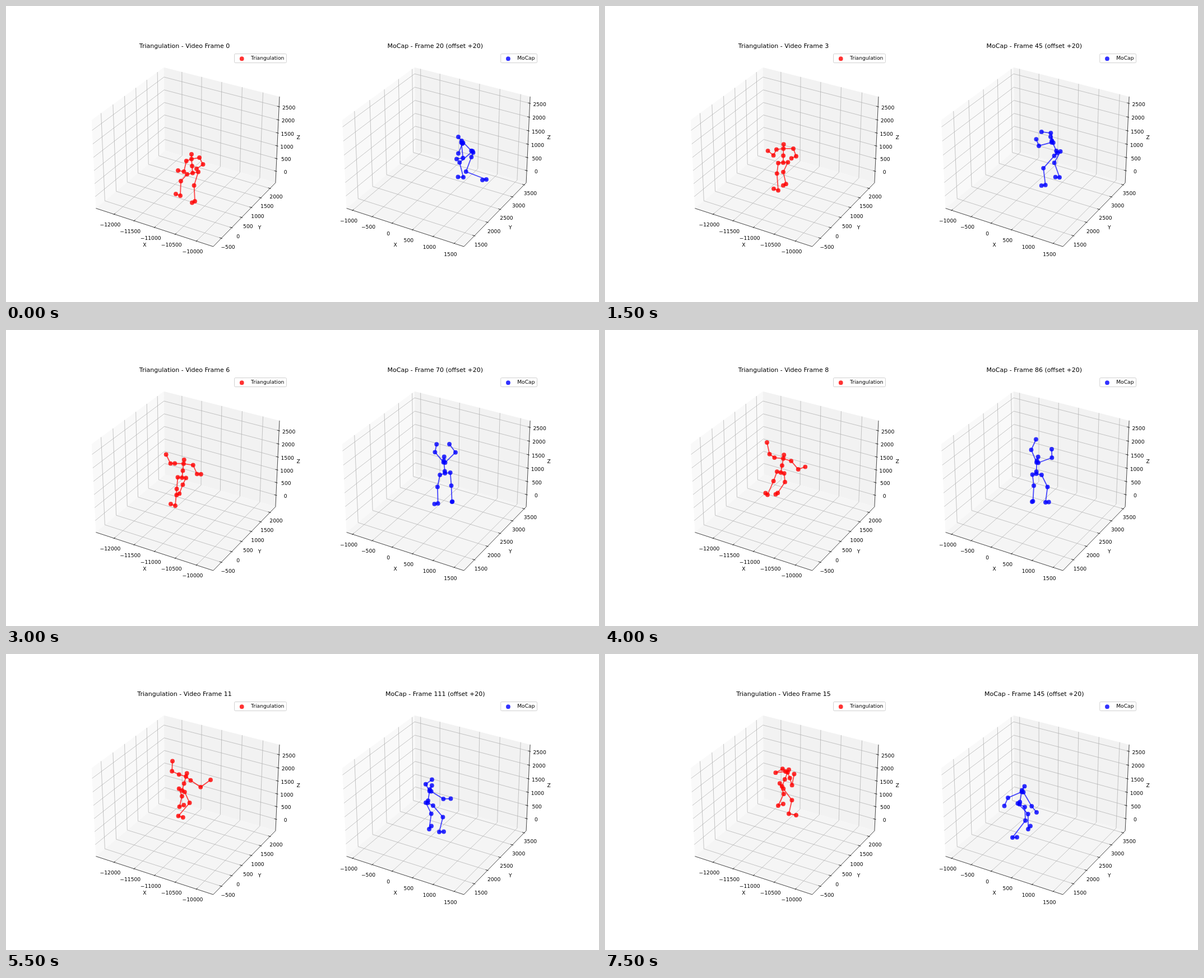
These frames come from a looping animation (1058 by 529 pixels, 8000 ms). An HTML page:

```html
<!DOCTYPE html>
<html lang="en">
<head>
<meta charset="utf-8">
<title>Skeleton comparison</title>
<style>
html, body { margin: 0; width: 100%; height: 100%; overflow: hidden; background: #fff; }
svg { display: block; width: 100%; height: 100%; }
text { font: 9.18px "DejaVu Sans", sans-serif; fill: #000; }
.title { font-size: 11.02px; }
.mid { text-anchor: middle; }
.grid, .axis { fill: none; stroke: #b0b0b0; stroke-width: .73; }
.axis { stroke: #000; }
.legend { fill: #fff; stroke: #ccc; stroke-width: .92; }
.bone { fill: none; stroke-width: 1.84; opacity: .7; }
.joint { stroke-width: 1.38; opacity: .8; }
</style>
</head>
<body>
<svg id="stage" viewBox="0 0 1058 529"></svg>
<script>
const STEP_MS = 500, STEPS = 16;
const LEFT = 132.25, RIGHT = 579.45;
const stage = document.getElementById('stage');

function add(name, attrs, text) {
  const el = document.createElementNS('http://www.w3.org/2000/svg', name);
  for (const key in attrs) el.setAttribute(key, attrs[key]);
  if (text !== undefined) el.textContent = text;
  return stage.appendChild(el);
}
const toPath = points => 'M' + points.map(p => p.map(v => v.toFixed(2)).join()).join('L');

// Perspective box seen from azimuth -60, elevation 30
const H = 0.59524, HZ = 0.44643;
const HALF = [H, H, HZ];

function project(left, [x, y, z]) {
  const scale = 2014.6 / (10 - (0.433 * x - 0.75 * y + 0.5 * z));
  return [left + 191.35 + (0.866 * x + 0.5 * y) * scale,
          262.1 - (-0.25 * x + 0.433 * y + 0.866 * z) * scale];
}

// For each axis: its edge, the grid line through a value, the tick direction
const AXES = [
  { edge: v => [v, -H, -HZ], grid: v => [[v, -H, -HZ], [v, H, -HZ], [v, H, HZ]], dir: 1, sign: -1 },
  { edge: v => [H, v, -HZ], grid: v => [[H, v, -HZ], [-H, v, -HZ], [-H, v, HZ]], dir: 0, sign: 1 },
  { edge: v => [H, H, v], grid: v => [[-H, -H, v], [-H, H, v], [H, H, v]], dir: 0, sign: 1 }
];

function drawBox(left, ranges) {
  const path = (pts, attrs) => add('path', { d: toPath(pts.map(p => project(left, p))), ...attrs });
  const label = (p, dy, text) => {
    const [x, y] = project(left, p);
    add('text', { class: 'mid', x, y: y + dy }, text);
  };
  const outward = (p, own, amount) =>
    p.map((v, i) => i === own ? v : v + Math.sign(v) * amount * 2 * HALF[i]);
  const ticks = ranges.map(([min, max], i) => {
    const list = [];
    for (let value = Math.ceil(min / 500) * 500; value <= max; value += 500)
      list.push([value, ((value - min) / (max - min) * 2 - 1) * HALF[i]]);
    return list;
  });

  path([[-H, -H, -HZ], [-H, H, -HZ], [-H, H, HZ], [-H, -H, HZ]], { fill: '#f9f9f9' });
  path([[-H, H, -HZ], [H, H, -HZ], [H, H, HZ], [-H, H, HZ]], { fill: '#f2f2f2' });
  path([[-H, -H, -HZ], [H, -H, -HZ], [H, H, -HZ], [-H, H, -HZ]], { fill: '#f5f5f5' });
  AXES.forEach((axis, i) => ticks[i].forEach(([, v]) => path(axis.grid(v), { class: 'grid' })));
  AXES.forEach((axis, i) => {
    path([axis.edge(-HALF[i]), axis.edge(HALF[i])], { class: 'axis' });
    for (const [value, v] of ticks[i]) {
      const along = d => axis.edge(v).map((c, k) => k === axis.dir ? c + axis.sign * d : c);
      path([along(0.0095), along(-0.019)], { class: 'axis' });
      label(outward(axis.edge(v), i, 0.0544), 7, String(value).replace('-', '\u2212'));
    }
    label(outward(axis.edge(0), i, 0.1183), 2.8, 'XYZ'[i]);
  });
}

function drawLegend(left, width, name, color) {
  const x = left + 368.1 - width;
  add('rect', { class: 'legend', x, y: 85.5, width, height: 16, rx: 1.8 });
  add('circle', { class: 'joint', cx: x + 13.2, cy: 94.2, r: 3.2, fill: color, stroke: color });
  add('text', { x: x + 29.4, y: 96.4 }, name);
}

// Motion rules, all in steps t = 0..15
const fall = (t, power) => (1 - t / 15) ** power;
const bump = (t, center, width) => Math.exp(-(((t - center) / width) ** 2));
function glide(t, from, to, begin, end) {
  const s = Math.min(1, Math.max(0, (t - begin) / (end - begin)));
  return from + (to - from) * s * s * (3 - 2 * s);
}
const shift = ([x, y], dx, dy) => [x + dx, y + dy];
const mix = (a, b, k) => a.map((v, i) => v + (b[i] - v) * k);

// Shape-preserving cubic through a few [step, x, y] points, held at both ends
function trail(...keys) {
  const last = keys.length - 1;
  const rate = (i, k) => (keys[i + 1][k] - keys[i][k]) / (keys[i + 1][0] - keys[i][0]);
  const slope = (i, k) => {
    if (i === 0) return rate(0, k);
    if (i === last) return rate(last - 1, k);
    const a = rate(i - 1, k), b = rate(i, k);
    return a * b > 0 ? 2 * a * b / (a + b) : 0;
  };
  return step => {
    const t = Math.min(keys[last][0], Math.max(keys[0][0], step));
    let i = 0;
    while (i < last - 1 && t >= keys[i + 1][0]) i++;
    const gap = keys[i + 1][0] - keys[i][0], s = (t - keys[i][0]) / gap, r = 1 - s;
    return [1, 2].map(k =>
      r * r * ((1 + 2 * s) * keys[i][k] + s * gap * slope(i, k)) +
      s * s * ((3 - 2 * s) * keys[i + 1][k] - r * gap * slope(i + 1, k)));
  };
}

// Elbows and knees sit halfway along the limb, pushed out by a bend
const arm = (neck, shoulder, hand, bend) =>
  [neck, shoulder, shift(mix(shoulder, hand, 0.5), ...bend), hand];
const leg = (pelvis, hip, ankle, bend, foot) =>
  [pelvis, hip, shift(mix(hip, ankle, 0.5), ...bend), ankle, shift(ankle, ...foot)];

const red = {
  handA: trail([0, 340, 291], [2, 330, 277], [5, 343.5, 263.5], [11, 365, 225], [13, 337.5, 214.5]),
  handB: trail([0, 307, 294], [5, 285, 235.5], [8, 289, 201], [11, 297, 191.5], [13, 322, 210]),
  ankleA: trail([0, 337, 349], [2, 330, 332.5], [5, 310, 293.5], [11, 307.5, 289.5], [15, 328, 285.5]),
  ankleB: trail([0, 311, 339], [5, 307, 321.5], [8, 290, 294.5], [11, 309.5, 273], [15, 309, 271])
};
function redPose(t) {
  const pelvis = [309 + 24 * Math.exp(-t / 2.6) + 0.45 * t, 236.5 + 62 * fall(t, 1.6)];
  const neck = shift(pelvis, 0.8 * t - 2, -25);
  const head = shift(neck, 0.15 * t, 0.25 * t - 8.5);
  const shoulderA = shift(neck, 11 + 7 * Math.cos((t - 4) * 0.28), 0.85 * t - 2.5);
  const shoulderB = shift(neck, -12.5 - 3.5 * Math.cos((t - 7) * 0.4), 3.5 - 0.65 * t);
  const hipA = shift(pelvis, 10 - 0.5 * t, 0.42 * t - 2);
  const hipB = shift(pelvis, 0.4 * t - 10, 2.3 - 0.5 * t);
  return [
    [head, neck, mix(neck, pelvis, 0.5), pelvis],
    arm(neck, shoulderA, red.handA(t), [glide(t, 9, 0, 2, 5), 2 + 0.95 * t]),
    arm(neck, shoulderB, red.handB(t), [3 - 0.08 * t * t, 10.5 - 0.4 * t]),
    leg(pelvis, hipA, red.ankleA(t), [4 + 11 * Math.cos((t - 12) * 0.32), -2],
      [glide(t, -5, 13, 7, 13), 2.5]),
    leg(pelvis, hipB, red.ankleB(t), [0.9 * t - 5, 0.4 * t - 7], [glide(t, -8, 9, 6, 12), -3])
  ];
}

const blue = {
  handA: trail([0, 804, 273.5], [2, 771, 252], [5, 768, 212], [8, 769, 195.5], [11, 760, 224.5], [15, 712.5, 271.5]),
  handB: trail([0, 807, 263.5], [2, 777, 240], [5, 787, 202.5], [8, 797, 213], [11, 793.5, 258.5], [13, 770, 283]),
  ankleA: trail([0, 857, 310], [2, 793.5, 321], [8, 763.5, 306], [11, 755, 313]),
  ankleB: trail([2, 816, 306], [8, 786, 308], [11, 773, 318], [15, 727, 328])
};
function bluePose(t) {
  const pelvis = [739.5 + 94 * fall(t, 1.5), 262 + 0.43 * t - 10 * bump(t, 7, 2.5)];
  const neck = shift(pelvis, 4.5 - 25 * fall(t, 2.6), -21 - 0.27 * t);
  const head = shift(neck, 4.5 - 10.5 * fall(t, 2), -7);
  const shoulderA = shift(neck, -0.5, 3);
  const shoulderB = shift(neck, 2.5, 3.5);
  const hipA = shift(pelvis, -3 - 6 * bump(t, 6, 3), 9.5 * fall(t, 1.5) - 1.5);
  const hipB = shift(pelvis, glide(t, -1, 9.5, 0, 5), glide(t, -2.5, 5, 4, 11));
  return [
    [head, neck, mix(neck, pelvis, 0.84), pelvis],
    arm(neck, shoulderA, blue.handA(t), [glide(t, 7, -9, 0, 3), glide(t, 13, -2, 2, 5)]),
    arm(neck, shoulderB, blue.handB(t), [3 + 12 * bump(t, 6.5, 3), glide(t, -8, 7, 2, 11)]),
    leg(pelvis, hipA, blue.ankleA(t), [9 - 32 * fall(t, 2), glide(t, 6, -4, 0, 2)],
      [glide(t, -7, 4, 5, 11), glide(t, 1, -5.5, 8, 11)]),
    leg(pelvis, hipB, blue.ankleB(t), [glide(t, -15, 12, 0, 11), -3], [glide(t, -9.5, 8, 1, 10), -0.5])
  ];
}

function makeFigure(color, pose) {
  // Limbs start at a torso joint, so only their later points get dots
  const dotPoints = chains => chains.flatMap((chain, i) => i ? chain.slice(1) : chain);
  const chains = pose(0);
  const bones = chains.map(() => add('path', { class: 'bone', stroke: color }));
  const dots = dotPoints(chains).map(() => add('circle', { class: 'joint', r: 3.25, fill: color, stroke: color }));
  return t => {
    const now = pose(t);
    now.forEach((chain, i) => bones[i].setAttribute('d', toPath(chain)));
    dotPoints(now).forEach(([x, y], i) => {
      dots[i].setAttribute('cx', x);
      dots[i].setAttribute('cy', y);
    });
  };
}

drawBox(LEFT, [[-12464, -9610], [-886, 2309], [-463, 2876]]);
drawBox(RIGHT, [[-1158, 1726], [1112, 3588], [-466, 2740]]);
const figures = [makeFigure('#f00', redPose), makeFigure('#00f', bluePose)];
drawLegend(LEFT, 92.8, 'Triangulation', '#f00');
drawLegend(RIGHT, 64.8, 'MoCap', '#00f');
const titles = [LEFT, RIGHT].map(x => add('text', { class: 'title mid', x: x + 186.35, y: 75.3 }, ''));

const start = performance.now();
let shown = -1;
function render(now) {
  const step = Math.floor(Math.max(0, now - start) / STEP_MS) % STEPS;
  if (step !== shown) {
    shown = step;
    figures.forEach(draw => draw(step));
    titles[0].textContent = `Triangulation - Video Frame ${step}`;
    titles[1].textContent = `MoCap - Frame ${20 + Math.floor(step * 25 / 3)} (offset +20)`;
  }
  requestAnimationFrame(render);
}
render(start);
</script>
</body>
</html>
```
